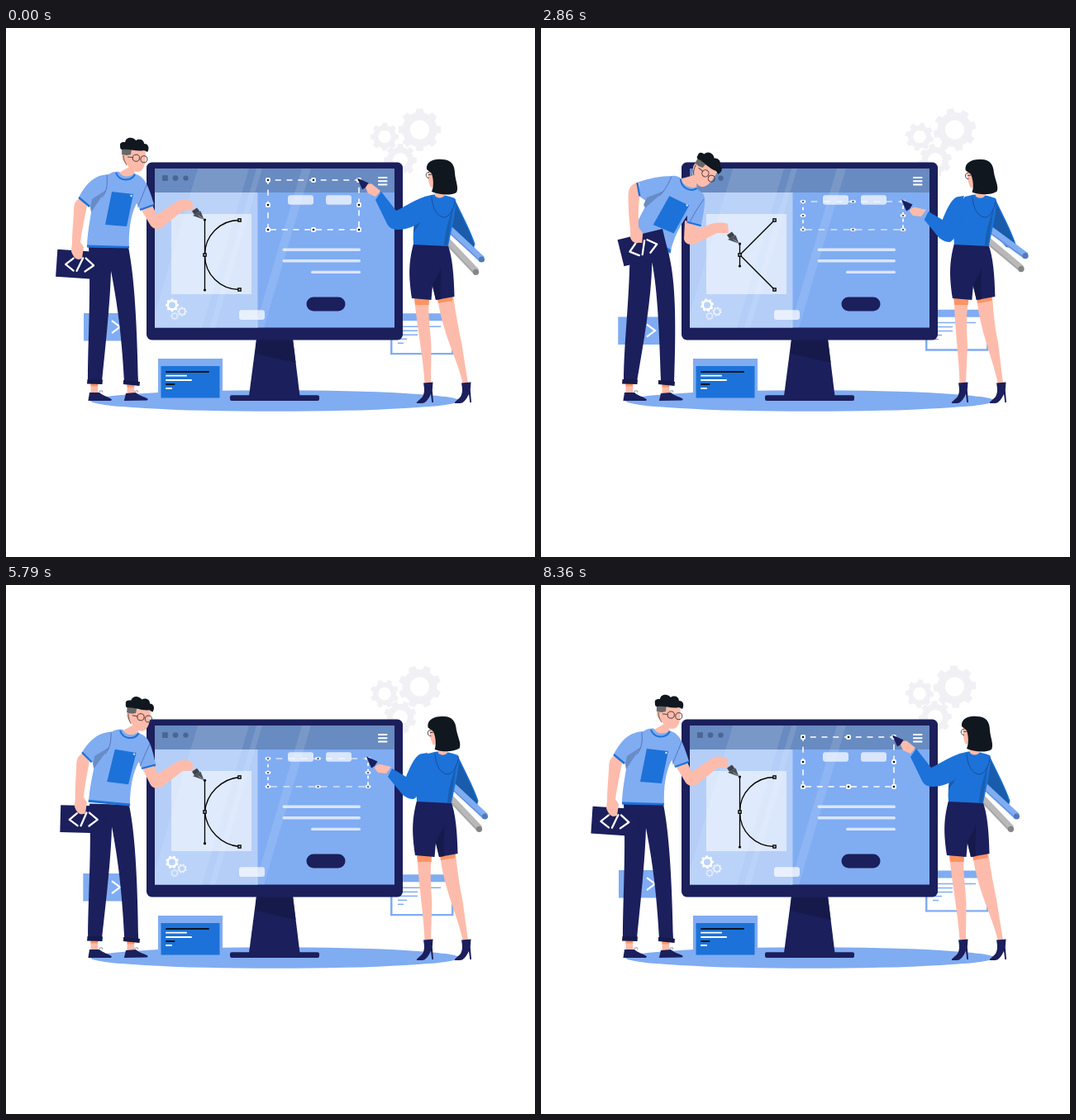
Write an HTML page with a canvas that moves like this. It is 640 by 640 pixels and loops after 8.43 s.

```html
<!DOCTYPE html>
<html lang="en">
<head>
<meta charset="utf-8">
<title>Design team</title>
<style>
html, body { margin: 0; width: 100%; height: 100%; overflow: hidden; background: #fff; }
canvas { display: block; width: 640px; height: 640px; }
</style>
</head>
<body>
<canvas id="stage"></canvas>
<script>
const LOOP = 8430, TAU = Math.PI * 2;
const SKY = '#80acf2', BLUE = '#1c72d8', NAVY = '#1b1f5c', DEEP = '#161a4b';
const SKIN = '#fdbcab', PEACH = '#fd9363', INK = '#10171f', FAINT = '#f1f1f5';
const canvas = document.getElementById('stage');
const c = canvas.getContext('2d');
const dpr = window.devicePixelRatio || 1;
canvas.width = canvas.height = 640 * dpr;

const mix = (a, b, k) => a + (b - a) * k;
const NUM = /-?\d+(\.\d+)?/g;

// Interpolates two path strings that share the same commands.
function morph(a, b, k) {
  const n = b.match(NUM);
  let i = 0;
  return new Path2D(a.replace(NUM, v => mix(+v, +n[i++], k).toFixed(2)));
}
function track(t, keys) {
  let i = 1;
  while (i < keys.length - 1 && t > keys[i][0]) i++;
  const [t0, a] = keys[i - 1], [t1, b] = keys[i];
  const k = Math.min(1, Math.max(0, (t - t0) / (t1 - t0)));
  return mix(a, b, k * k * (3 - 2 * k));
}
const toPath = p => typeof p === 'string' ? new Path2D(p) : p;
function fill(p, color) {
  c.fillStyle = color;
  c.fill(toPath(p));
}
function stroke(p, color, w = 1) {
  c.strokeStyle = color;
  c.lineWidth = w;
  c.stroke(toPath(p));
}
function rect(x, y, w, h, color, r = 0) {
  c.fillStyle = color;
  c.beginPath();
  c.roundRect(x, y, w, h, r);
  c.fill();
}
function disc(x, y, r, color) {
  c.fillStyle = color;
  c.beginPath();
  c.arc(x, y, r, 0, TAU);
  c.fill();
}
function ring(x, y, r, color, w) {
  c.strokeStyle = color;
  c.lineWidth = w;
  c.beginPath();
  c.arc(x, y, r, 0, TAU);
  c.stroke();
}
function group(draw) {
  c.save();
  draw();
  c.restore();
}
function pivot(x, y, deg) {
  c.translate(x, y);
  c.rotate(deg * TAU / 360);
  c.translate(-x, -y);
}
function gear(x, y, r, hole, angle, color) {
  const teeth = 8, step = TAU / teeth, root = r * 0.81;
  c.fillStyle = color;
  c.beginPath();
  for (let i = 0; i < teeth; i++) {
    const a = angle + i * step - TAU / 4;
    for (const [da, rr] of [[-0.3, root], [-0.2, r], [0.2, r], [0.3, root]])
      c.lineTo(x + rr * Math.cos(a + da * step), y + rr * Math.sin(a + da * step));
    c.arc(x, y, root, a + 0.3 * step, a + 0.7 * step);
  }
  c.closePath();
  c.moveTo(x + hole, y);
  c.arc(x, y, hole, 0, TAU, true);
  c.fill();
}

function backdrop(phase) {
  const a = phase * TAU;
  gear(500.5, 123, 26, 11.5, a, FAINT);
  gear(458, 131.5, 17.3, 7.7, -a, FAINT);
  gear(477, 160, 20, 9, a, FAINT);

  c.fillStyle = SKY;
  c.beginPath();
  c.ellipse(325.5, 451, 223, 12.8, 0, 0, TAU);
  c.fill();

  const ly = 348 - 2.9 * Math.cos(a);
  rect(93.5 + 0.5 * Math.cos(a), ly, 53, 33.5, SKY);
  stroke(`M128 ${ly + 9}L138 ${ly + 16.5}L128 ${ly + 24}`, '#fff', 2.2);

  const ry = 345.3 - 5.5 * Math.sin(a);
  rect(465, ry, 76.5, 50, SKY);
  rect(467.5, ry + 9, 71.5, 38.7, '#fff');
  [[471, 526], [471, 498], [471, 498], [474, 485], [474, 481]].forEach(([x, x2], i) =>
    rect(x, ry + 15.2 + i * 5, x2 - x, 1.5, SKY));
}

function codeCard() {
  rect(184, 400, 78, 50, SKY);
  rect(187.5, 409, 71, 38.5, BLUE);
  [[246, 416, INK], [219, 420.7, '#fff'], [225, 426, '#fff'], [204.5, 431, INK], [201, 436, '#fff']]
    .forEach(([x, y, color]) => rect(193, y - 0.9, x - 193, 1.8, color, 0.9));
}

function monitor(phase) {
  fill('M303 376L347 376L355.5 445L294 445Z', NAVY);
  fill('M303 377L347 377L350.5 405L301.5 394Z', DEEP);
  rect(271, 444.3, 108, 6.7, NAVY, 2);
  rect(170, 162.5, 310, 215, NAVY, 6.5);
  group(() => {
    c.beginPath();
    c.rect(180, 170, 290, 192.5);
    c.clip();
    rect(180, 170, 290, 193, SKY);
    rect(180, 199, 124.5, 164, '#b4cef8');
    rect(180, 170, 290, 29, '#688bc1');
    for (const [x, w] of [[232, 62], [303, 7], [358, 11]])
      fill(`M${x} 170h${w}l-57 193h${-w}Z`, 'rgba(255,255,255,.11)');
  });
  const dots = '#4b6694';
  rect(189, 178.2, 6.8, 6.8, dots);
  disc(205, 181.6, 3.4, dots);
  disc(217.5, 181.6, 3.2, dots);
  for (const y of [181, 185.2, 189.6]) rect(450, y - 1, 11.5, 2, '#fff', 0.8);

  rect(200, 225, 97, 97, 'rgba(255,255,255,.53)');
  const a = phase * TAU;
  gear(201, 335.3, 8, 4, a, '#fff');
  gear(213, 343, 5.7, 2.9, -a, 'rgba(255,255,255,.7)');
  gear(204, 348.5, 4.8, 2.5, a, 'rgba(255,255,255,.55)');
  const soft = 'rgba(255,255,255,.7)';
  rect(282, 341.2, 31, 11.8, soft, 3);
  rect(341, 202.2, 31, 11.6, soft, 3);
  rect(387, 202.2, 31, 11.6, soft, 3);
  for (const [x, y] of [[334.5, 268.2], [334.5, 281.8], [369, 295.4]])
    rect(x, y - 1.7, 429 - x, 3.4, soft, 1.7);
  rect(363.5, 325.5, 47, 17, NAVY, 8.5);
}

function selection(q) {
  group(() => {
    c.translate(317, 244);
    c.scale(1 + q * 0.1, 1 - q * 0.433);
    c.setLineDash([7, 6.75]);
    stroke('M0 0V-60H110V0Z', '#fff', 1.5);
    c.setLineDash([]);
    for (const x of [0, 55, 110]) for (const y of [0, -30, -60]) {
      if (x === 55 && y === -30) continue;
      rect(x - 2.9, y - 2.9, 5.8, 5.8, '#fff', 1.6);
      disc(x, y, 1.35, INK);
    }
  });
}

function curveTool(p) {
  const h = mix(42.5, 13.5, p);
  stroke(morph('M282.5 232.5C259 232.5 240.5 251 240.5 274.5C240.5 298 259 316.5 282.5 316.5',
    'M282.5 232.5C268 247 254 261 240.5 274.5C254 288 268 302 282.5 316.5', p), '#000', 1.35);
  stroke(`M240.5 ${274.5 - h}V${274.5 + h}`, '#000', 1.3);
  disc(240.5, 274.5 - h, 1.6, '#000');
  disc(240.5, 274.5 + h, 1.6, '#000');
  for (const [x, y] of [[282.5, 232.5], [282.5, 316.5], [240.5, 274.5]]) {
    rect(x - 2.3, y - 2.3, 4.6, 4.6, '#000');
    rect(x - 1, y - 1, 2, 2, '#b9c6dc');
  }
}

function manHead(p) {
  c.translate(mix(162, 200.5, p), mix(158, 178, p));
  c.rotate(p * 30 * TAU / 360);
  c.translate(-162, -158);
  fill('M142 148L168.5 148C169.5 158 168.5 169 163 173C157 176 150 172 147 166L143 162C139 158 140 153 142 151Z', SKIN);
  fill('M140 145L152 145L151 153L146 154L140 153Z', '#686868');
  fill('M138 143C137 138 141 138 144 138C145 132 153 131 157 136C161 133 167 135 167 140C172 140 174 145 171 150L167 148C158 150 150 146 141 147C138 147 138 145 138 143Z', INK);
  stroke('M142 154C142 159 144 163 146 166', '#5b4a55', 0.9);
  stroke('M147 156L153 156.5', '#4a2f35', 0.9);
  ring(157.3, 157.2, 4.1, '#4a2f35', 0.95);
  ring(166.8, 158.7, 4, '#4a2f35', 0.95);
}

function man(p, arm, reach) {
  for (const [x, y] of [[102.5, 430], [146.5, 431]]) {
    rect(x, y, 8.7, 12, SKIN);
    rect(x, y, 8.7, 3.5, PEACH);
  }
  fill('M99.5 450.5L101 441L113 441C117 445 124 446 128 449.5L127 451L99.5 451Z', NAVY);
  fill('M143 450.5L145 442L157 441C161 445 168 446 172 449L170.500 450.5L143 451Z', NAVY);
  stroke('M112 440L116 438.500L117 441M155 440L159 438.500L160 441', '#777b98', 0.8);

  fill(morph('M100 265L148 265C153 290 158 330 160 428L143 428C140 370 134 330 127 294C126 330 121 380 116 428L99 428C99 380 103 320 100 265Z',
    'M107 262L154 272C161 300 164 340 161 428L145 428C143 370 141 320 134 284C133 330 124 380 116 428L100 428C100 380 108 320 107 262Z', p), NAVY);
  fill('M98.500 425L117 425.500L116.500 431L98 430.500Z', DEEP);
  fill('M142 426L162 428L161.500 433L142 431Z', DEEP);

  fill(morph('M146 163L149 168L137 175C140 185 152 185 156 177L154 169Z',
    'M180 172L182 178L168 182C168 192 178 197 187 192L186 182Z', p), SKIN);
  fill(morph('M163 219L177 214L182 226L205 211C210 207 220 206 225 210L227 220L214 221L189 241C184 245 178 243 175 239Z',
    'M174 233L189 237L190 243L206 237C212 235 222 235 226 237L227 248L213 248L187 261C181 263 174 262 173 255Z', reach), SKIN);

  fill(morph('M124 177C128 174 134 173 137 174C140 181 150 181 155 176L160 178C168 182 172 190 179 213L162 220L158 212C151 225 148 245 149 266L98 265C98 250 102 230 104 217L101 216L88 205C98 186 108 178 124 177Z',
    'M157 179C160 178 164 179 167 181C168 188 178 194 186 192L190 196C198 200 199 206 193 238L176 234L176 226C168 238 160 252 156 272L112 245C117 232 122 222 128 211L118 204L114 188C130 182 143 179 157 179Z', p), SKY);
  fill(morph('M121 196L104 207L102 217L103 223Z', 'M148 197L127 205L123 214L125 218Z', p), '#688cc6');
  fill(morph('M98 262.500L149 264L149 266.500L98 265.500Z', 'M110 243L157 268L156 272.500L109 247Z', p), BLUE);
  fill(morph('M128 198L154 201L146 240L120 238Z', 'M154 203L178 214L160 248L135 238Z', p), BLUE);
  disc(mix(151.5, 175.5, p), mix(203, 214, p), 1.2, '#d8e6fb');
  stroke(morph('M133 175C137 186 151 186 156 177', 'M167 182C168 192 178 199 187 193', p), BLUE, 2);
  const seam = 'rgba(27,31,92,.55)';
  stroke(morph('M122 178C123 190 122 197 116 205', 'M156 180C152 190 148 197 142 203', p), seam, 0.7);
  stroke(morph('M170 190C166 200 162 210 159 217', 'M196 206C190 214 184 224 179 234', p), seam, 0.7);

  group(() => {
    c.translate(mix(89.3, 118.7, arm), mix(286, 268.6, arm));
    c.rotate(mix(3.8, -11.3, arm) * TAU / 360);
    rect(-28, -16.5, 56, 33, NAVY);
    c.lineJoin = c.lineCap = 'round';
    stroke('M-8 -7L-17 1L-7 8M3.500 -8L-3 8M7 -8L17 0L7 8', '#fff', 2.3);
  });
  fill(morph('M90 206C84 208 82 213 82 222C81 240 80 250 80 260L79 270C81 276 84 280 88 280L92 279L94 265L90 259C92 245 95 230 98 216Z',
    'M116 189C106 190 103 196 103 205C103 225 104 235 105 245L105 256C107 261 111 263 115 262L119 262L120 250L115 243C115 230 115 220 117 204Z', mix(p, arm, 0.6)), SKIN);
  stroke(morph('M88 205L101 216', 'M115 188L118.500 204', p), BLUE, 2.4);
  stroke(morph('M162 220L179 214', 'M176 234L193 238', p), BLUE, 2.2);
  group(() => manHead(p));

  group(() => {
    c.translate(0, 29 * reach);
    fill('M225 221.500L231 217.500L234.500 222L228 226Z', '#3d434c');
    fill('M226 227L235.500 221.500L239.500 231.800Z', '#4a5059');
    stroke('M238.500 230.800L232.500 226.500', '#a9b0ba', 0.8);
  });
}

function womanHead() {
  fill('M519 193L519 203C523 207 529 206 531 202L530 195Z', SKIN);
  fill('M511 170L519 170L520 190L514 193C511 188 510 180 511 170Z', SKIN);
  fill('M509 171C508 162 517 158 527 159C539 159 543 166 543 176C544 186 548 193 545 199C538 203 524 202 515 198C518 191 517 182 515 176Z', INK);
  stroke('M512 174.500C507 173.500 507 182 512 181.500M511 177.500L516 177', '#39343c', 0.9);
}

function woman(q, s, tilt) {
  const hip = s / 7, extra = s - 4 * Math.max(0, q);

  fill(morph('M494 326L512 326C510 345 513 360 514.500 385L514 430L506.500 430C505 400 497 360 494 326Z',
    'M500 326L518 326C514 345 515 360 516 385L514 430L506.500 430C506 400 500 360 500 326Z', hip), SKIN);
  fill(morph('M522 326L541 324C545 350 547 360 551 380L559 430L553 431C546 400 528 370 522 326Z',
    'M527 326L546 324C548 350 549 360 553 380L559 430L553 431C547 400 532 370 527 326Z', hip), SKIN);
  group(() => {
    c.translate(s * 0.75, 0);
    fill('M494 326L512 326L511.500 335L495 335Z', PEACH);
    fill('M522 326L540 324L540.500 330L523 333Z', PEACH);
  });
  for (const x of [0, 46]) group(() => {
    c.translate(x, 0);
    fill('M505 429.500L516.500 428.500L515.800 438L517 453L515.300 453L514 443C511 449 508 454 503 454L497 454C496 452 502 449 504 446C507 441 506 435 505 429.500Z', NAVY);
  });

  group(() => {
    c.translate(s, 0);
    fill('M543 208C552 227 562 245 567 262L566 267L556 265L535 243Z', '#185cab');
    stroke('M543 209C552 228 562 246 567 262', BLUE, 1.4);
    group(() => {
      pivot(540, 245, -2.3 * extra);
      c.lineCap = 'butt';
      stroke('M530 254L569 295', '#b8b8b8', 8.5);
      stroke('M532 260L567 297', '#8e8e8e', 0.8);
      disc(568.5, 295.3, 3.6, '#858585');
      stroke('M534 241L576 280', SKY, 8.5);
      stroke('M537 248L573 281', '#5277b8', 0.8);
      disc(575.4, 280, 3.6, '#5379bb');
    });
    fill('M493 261L534 261C540 275 542 300 542.500 325L520 329L516 312L514.500 329L491 327C487 300 487 284 493 261Z', NAVY);
    fill('M526 289C525 297 517 306 516 312L520 329L526.500 328C524 316 527 303 526 289Z', DEEP);
    fill('M511 203C520 200 533 202 543 206C546 215 540 240 535 264L493 262C492 252 493 243 494 236C498 225 500 212 506 204Z', BLUE);
    fill('M494 236L503 233L493 248Z', '#185cab');
    fill('M541 218L534 263L530 264C531 248 535 232 541 218Z', '#195fb1');
    stroke('M515 204C516 220 523 229 531 229C538 228 543 215 543.500 207', 'rgba(27,31,92,.6)', 0.75);
    group(() => {
      pivot(526, 203, tilt);
      womanHead();
    });
  });

  fill(morph('M447 204L453 197L443 189C440 188 435 189 434 191L438 200Z',
    'M460 228L466 220L453 217C449 217 446 219 446 222L450 227Z', q), SKIN);
  group(() => {
    c.translate(extra * 0.6, 0);
    fill(morph('M454 198L472 221C485 215 497 206 508 204L514 203L506 232C495 240 485 244 474 244C468 244 464 242 461 237L447 208Z',
      'M467 222L484 232C488 222 494 208 501 204.500L510 203L507 236C503 250 497 257 493 259C488 259 484 257 480 254L462 232Z', q), BLUE);
  });
  group(() => {
    c.translate(11 * q, 26 * q);
    fill('M425 181.500L438.500 187.500L435 193L431 195.500Z', NAVY);
  });
}

function draw(t) {
  const phase = t / LOOP;
  const lean = track(t, [[150, 0], [1400, 1], [5080, 1], [6020, 0], [LOOP, 0]]);
  const bob = Math.cos(TAU * (t - 2860) / (LOOP / 4)) + 0.7;
  const q = track(t, [[0, 0], [1300, -0.1], [1650, -0.1], [2450, 1], [6950, 1], [8050, 0], [LOOP, 0]]);
  const shift = track(t, [[0, 0], [1500, -0.4], [1700, -0.4], [2650, 7.4], [3500, 4], [6900, 4], [8050, 0], [LOOP, 0]]);
  const tilt = track(t, [[0, 0], [1570, -6], [2860, -4], [3860, -8], [5070, -13], [6570, 5], [LOOP, 0]]);

  c.setTransform(dpr, 0, 0, dpr, 0, 0);
  c.fillStyle = '#fff';
  c.fillRect(0, 0, 640, 640);
  backdrop(phase);
  codeCard();
  monitor(phase);
  selection(q);
  curveTool(lean);
  man(lean + 0.03 * bob, lean + mix(-0.06, 0.1, lean) * bob, lean);
  woman(q, shift, tilt);
}

const start = performance.now();
function frame() {
  draw((performance.now() - start) % LOOP);
  requestAnimationFrame(frame);
}
frame();
</script>
</body>
</html>
```
